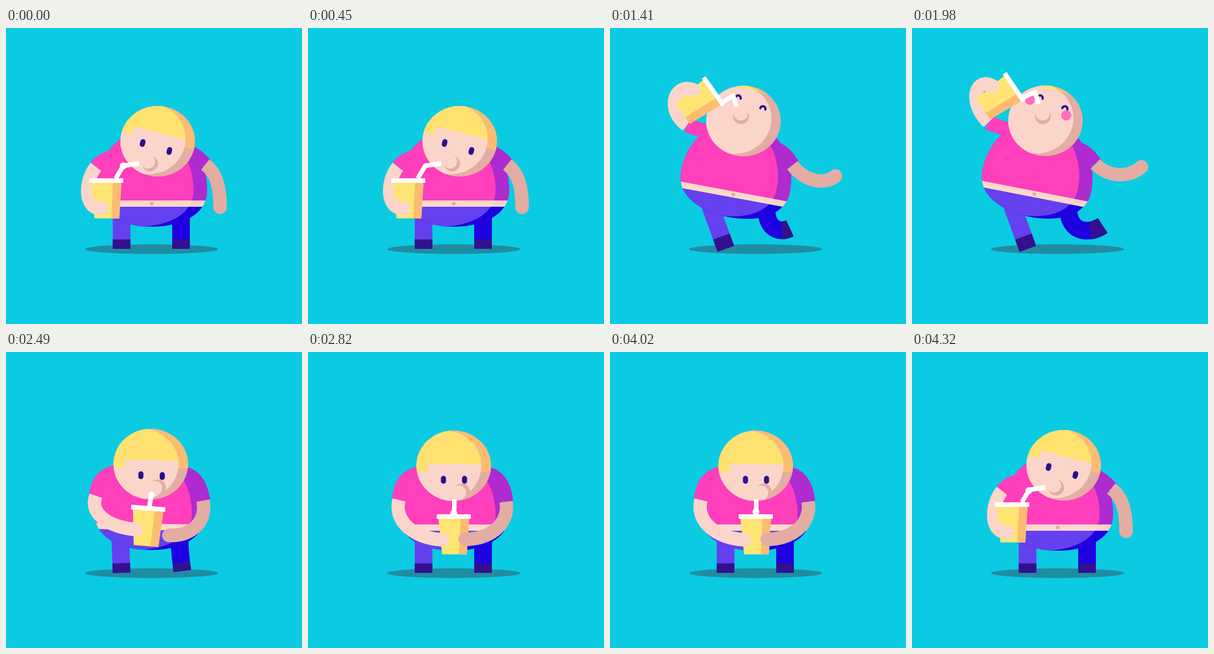
An HTML page with a canvas that plays this animation: 520x520 px, repeating every 4.35 s.

```html
<!DOCTYPE html>
<html lang="en">
<head>
<meta charset="utf-8">
<title>Thirsty fellow</title>
<style>
  html, body { margin: 0; width: 100%; height: 100%; overflow: hidden; background: #0acbe2; }
  canvas { display: block; width: 520px; height: 520px; }
</style>
</head>
<body>
<canvas id="stage"></canvas>
<script>
const LOOP = 4350;
const RAD = Math.PI / 180;

const color = {
  sky: '#0acbe2', shadow: '#208ca2', skin: '#fbd5ca', skinDark: '#e3ada4',
  shirt: '#ff3fbb', shirtDark: '#ae2bd0', pants: '#6540ee', pantsDark: '#1e00e0',
  shoe: '#33108f', hair: '#ffe170', hairDark: '#fdbc74', eye: '#2a108f',
  cup: '#ffe474', cupDark: '#fdbb72', cheek: '#ff6cc0'
};

// Arms and legs are cubic curves; a sleeve is its shoulder and bend, ending at the cuff.
const sideSip = {
  body: [256, 308, 0],
  head: [266.5, 199, 14, -15],
  nose: [253, 238, 45],
  eyes: [240, 202, 287, 216, 1],
  legL: [203, 330, 203, 349, 203, 368, 203, 388],
  legR: [307.5, 330, 307.5, 349, 307.5, 368, 307.5, 388],
  sleeveL: [205, 225, 175, 225],
  armL: [158, 244, 138, 268, 136, 318, 168, 317],
  sleeveR: [315, 215, 335, 222],
  armR: [350, 240, 370, 255, 376, 280, 376, 315],
  cup: [176, 264, 0],
  straw: [17, 0, 30, -22, 58, -26],
  sip: [1]
};

const crossSip = {
  ...sideSip,
  head: [247.5, 187, -11, -31],
  nose: [251, 219, 150],
  eyes: [223, 187, 271, 175, 0],
  sleeveL: [205, 235, 195, 250],
  armL: [208, 268, 222, 298, 265, 298, 307, 289],
  sleeveR: [300, 225, 320, 190],
  armR: [358, 206, 390, 218, 390, 258, 379, 281],
  cup: [296, 244, -28],
  straw: [19, 0, 33, -26, -7, -41]
};

const lean = {
  body: [215, 291.5, 11],
  head: [234.5, 163, 15, -56],
  nose: [230, 155, 85],
  eyes: [225, 123, 268.5, 142, 0],
  legL: [176, 312, 185, 337, 194, 362, 203.5, 388],
  legR: [275, 322, 277, 358, 310, 364, 335, 347],
  sleeveL: [185, 182, 155, 176],
  armL: [134, 166, 98, 130, 111, 85, 142, 102],
  sleeveR: [280, 210, 305, 212],
  armR: [322, 239, 345, 262, 380, 264, 403, 244],
  cup: [183, 102, 56],
  straw: [24, 0, 27, -22, 48, -15],
  sip: [0]
};

const tip = {
  ...lean,
  body: [216.5, 292, 10.5],
  head: [234.5, 163.5, 15, -56],
  legR: [275, 322, 277, 355, 300, 360, 316, 352],
  sleeveL: [185, 185, 160, 180],
  armL: [135, 171, 98, 145, 112, 95, 147, 109],
  armR: [320.5, 241, 342, 270, 378, 276, 396, 260],
  cup: [185, 109, 55],
  straw: [25, 0, 26, -20, 45, -14]
};

const frontSip = {
  ...sideSip,
  head: [256, 200, 0, -3],
  nose: [270, 245, -25],
  eyes: [238, 224.5, 275, 224.5, 1],
  sleeveL: [205, 213, 164, 213],
  armL: [160, 260, 151, 292, 178, 326, 236, 330],
  sleeveR: [307, 213, 343, 215],
  armR: [348, 263, 354, 298, 325, 329, 276, 329],
  cup: [256, 285, 0],
  straw: [0, 0, 1, -13, 1, -26]
};

const moves = [
  { start: 530, end: 780, from: sideSip, to: crossSip },
  { start: 1070, end: 1410, from: crossSip, to: tip },
  { start: 1410, end: 1630, from: tip, to: lean },
  { start: 2160, end: 2720, from: lean, to: frontSip },
  { start: 4020, end: 4310, from: frontSip, to: sideSip }
];

const clamp = x => Math.max(0, Math.min(1, x));
const ramp = (t, a, b) => clamp((t - a) / (b - a));

// Quick departure, long settle.
function ease(p) {
  const q = Math.pow(p, 0.6);
  return q < 0.5 ? 4 * q ** 3 : 1 - 4 * (1 - q) ** 3;
}

function poseAt(t) {
  const move = moves.filter(m => t >= m.start).pop();
  if (!move) return sideSip;
  const k = ease(ramp(t, move.start, move.end));
  const pose = {};
  for (const part in move.from) {
    pose[part] = move.from[part].map((v, i) => v + (move.to[part][i] - v) * k);
  }
  return pose;
}

const canvas = document.getElementById('stage');
const scale = window.devicePixelRatio || 1;
canvas.width = canvas.height = 520 * scale;
const ctx = canvas.getContext('2d');

function ellipse(x, y, rx, ry, fill) {
  ctx.beginPath();
  ctx.ellipse(x, y, rx, ry, 0, 0, 2 * Math.PI);
  if (fill) { ctx.fillStyle = fill; ctx.fill(); }
}

const circle = (x, y, r, fill) => ellipse(x, y, r, r, fill);

function rect(x, y, w, h, fill) {
  ctx.fillStyle = fill;
  ctx.fillRect(x, y, w, h);
}

function polygon(points, fill) {
  ctx.beginPath();
  points.forEach(p => ctx.lineTo(...p));
  ctx.fillStyle = fill;
  ctx.fill();
}

function stroke(width, paint, cap = 'butt') {
  ctx.lineWidth = width;
  ctx.strokeStyle = paint;
  ctx.lineCap = cap;
  ctx.lineJoin = 'round';
  ctx.stroke();
}

function placed(x, y, deg, draw) {
  ctx.save();
  ctx.translate(x, y);
  ctx.rotate(deg * RAD);
  draw();
  ctx.restore();
}

function cubic(c, t) {
  const u = 1 - t;
  const w = [u ** 3, 3 * u * u * t, 3 * u * t * t, t ** 3];
  return [0, 1].map(a => w.reduce((sum, k, i) => sum + k * c[2 * i + a], 0));
}

function limb(c, from, width, paint, cap) {
  ctx.beginPath();
  for (let i = 0; i <= 24; i++) ctx.lineTo(...cubic(c, from + (1 - from) * i / 24));
  stroke(width, paint, cap);
}

function leg(c, paint) {
  limb(c, 0, 31, paint);
  limb(c, 0.72, 31, color.shoe);
}

function sleeve(s, arm, paint) {
  ctx.beginPath();
  ctx.moveTo(s[0], s[1]);
  ctx.quadraticCurveTo(s[2], s[3], arm[0], arm[1]);
  stroke(25, paint);
}

// The forearm is flat at the cuff and round at the hand.
function forearm(c, paint) {
  limb(c, 0, 23.5, paint);
  circle(c[6], c[7], 11.75, paint);
}

function torsoPath(dx) {
  ctx.beginPath();
  ctx.moveTo(dx, -130);
  ctx.bezierCurveTo(dx - 55, -130, dx - 97.5, -85, dx - 97.5, -23);
  ctx.bezierCurveTo(dx - 97.5, 19, dx - 53, 41, dx, 41);
  ctx.bezierCurveTo(dx + 53, 41, dx + 97.5, 19, dx + 97.5, -23);
  ctx.bezierCurveTo(dx + 97.5, -85, dx + 55, -130, dx, -130);
}

function torso([x, y, tilt]) {
  const layers = (shirt, skin, pants) => {
    rect(-110, -140, 220, 136, shirt);
    rect(-110, -5, 220, 11, skin);
    rect(-110, 6, 220, 40, pants);
  };
  placed(x, y, tilt, () => {
    torsoPath(0);
    ctx.clip();
    layers(color.shirtDark, '#fbd2c2', color.pantsDark);
    torsoPath(-24);
    ctx.clip();
    layers(color.shirt, '#fdd9cc', color.pants);
  });
  circle(x, y + 0.5, 3.3, color.skinDark);
}

function head([x, y, tilt, hairline]) {
  const layers = (skin, hair) => {
    rect(-80, -80, 160, 160, skin);
    rect(-80, -80, 160, 80 + hairline, hair);
    rect(-80, hairline - 1, 34, 15, hair);
    rect(48, hairline - 1, 34, 15, hair);
  };
  const slant = tilt * RAD;
  ctx.save();
  ellipse(x, y, 65.5, 62);
  ctx.clip();
  placed(x, y, tilt, () => layers(color.skinDark, color.hairDark));
  ellipse(x - 17 * Math.cos(slant), y - 17 * Math.sin(slant), 65.5, 62);
  ctx.clip();
  placed(x, y, tilt, () => layers(color.skin, color.hair));
  ctx.restore();
}

function nose([x, y, deg]) {
  const a = deg * RAD;
  circle(x, y, 14, color.skinDark);
  circle(x - 5 * Math.cos(a), y - 5 * Math.sin(a), 12.5, color.skin);
}

function eye(x, y, open, tilt) {
  placed(x, y, tilt, () => {
    ctx.beginPath();
    if (open > 0.5) {
      ctx.moveTo(0, -2.4);
      ctx.lineTo(0, 2.4);
      stroke(9, color.eye, 'round');
    } else {
      ctx.arc(0, 0, 4.6, Math.PI, 2 * Math.PI);
      stroke(4, color.eye, 'round');
    }
  });
}

function straw(s, sip, flow) {
  ctx.beginPath();
  for (let i = 0; i < 6; i += 2) ctx.lineTo(s[i], s[i + 1]);
  stroke(8, '#fff');
  const first = Math.hypot(s[2] - s[0], s[3] - s[1]);
  const second = Math.hypot(s[4] - s[2], s[5] - s[3]);
  const d = flow * (first + second);
  const i = d < first ? 0 : 2;
  const k = d < first ? d / first : (d - first) / second;
  const size = 6 * sip * Math.min(1, 6 * (1 - flow));
  circle(s[i] + (s[i + 2] - s[i]) * k, s[i + 1] + (s[i + 3] - s[i + 1]) * k, size, '#fff');
}

function cup(pose, flow) {
  placed(...pose.cup, () => {
    straw(pose.straw, pose.sip[0], flow);
    polygon([[-27, 6], [27, 6], [23, 70.5], [-20.5, 70.5]], color.cup);
    polygon([[12, 6], [27, 6], [23, 70.5], [9, 70.5]], color.cupDark);
    rect(-30, 0, 60, 8, '#fff');
  });
}

function render(t) {
  const pose = poseAt(t);
  const [lx, ly, rx, ry, open] = pose.eyes;
  const blush = ramp(t, 1640, 1800) * (1 - ramp(t, 2160, 2260));
  const flow = (4 * t / LOOP + 0.47) % 1;

  ctx.setTransform(scale, 0, 0, scale, 0, 0);
  rect(0, 0, 520, 520, color.sky);
  ellipse(256, 388.5, 117, 8.5, color.shadow);

  leg(pose.legR, color.pantsDark);
  leg(pose.legL, color.pants);
  sleeve(pose.sleeveR, pose.armR, color.shirtDark);
  sleeve(pose.sleeveL, pose.armL, color.shirt);
  torso(pose.body);

  head(pose.head);
  nose(pose.nose);
  eye(lx, ly, open, pose.head[2]);
  eye(rx, ry, open, pose.head[2]);
  circle(207, 126, 9 * blush, color.cheek);
  circle(271, 153.5, 9 * blush, color.cheek);

  forearm(pose.armR, color.skinDark);
  forearm(pose.armL, color.skin);
  cup(pose, flow);
  limb(pose.armR, 0.78, 23.5, color.skinDark, 'round');
  limb(pose.armL, 0.78, 23.5, color.skin, 'round');
}

const begin = performance.now();
function tick() {
  render((performance.now() - begin) % LOOP);
  requestAnimationFrame(tick);
}
tick();
</script>
</body>
</html>
```
